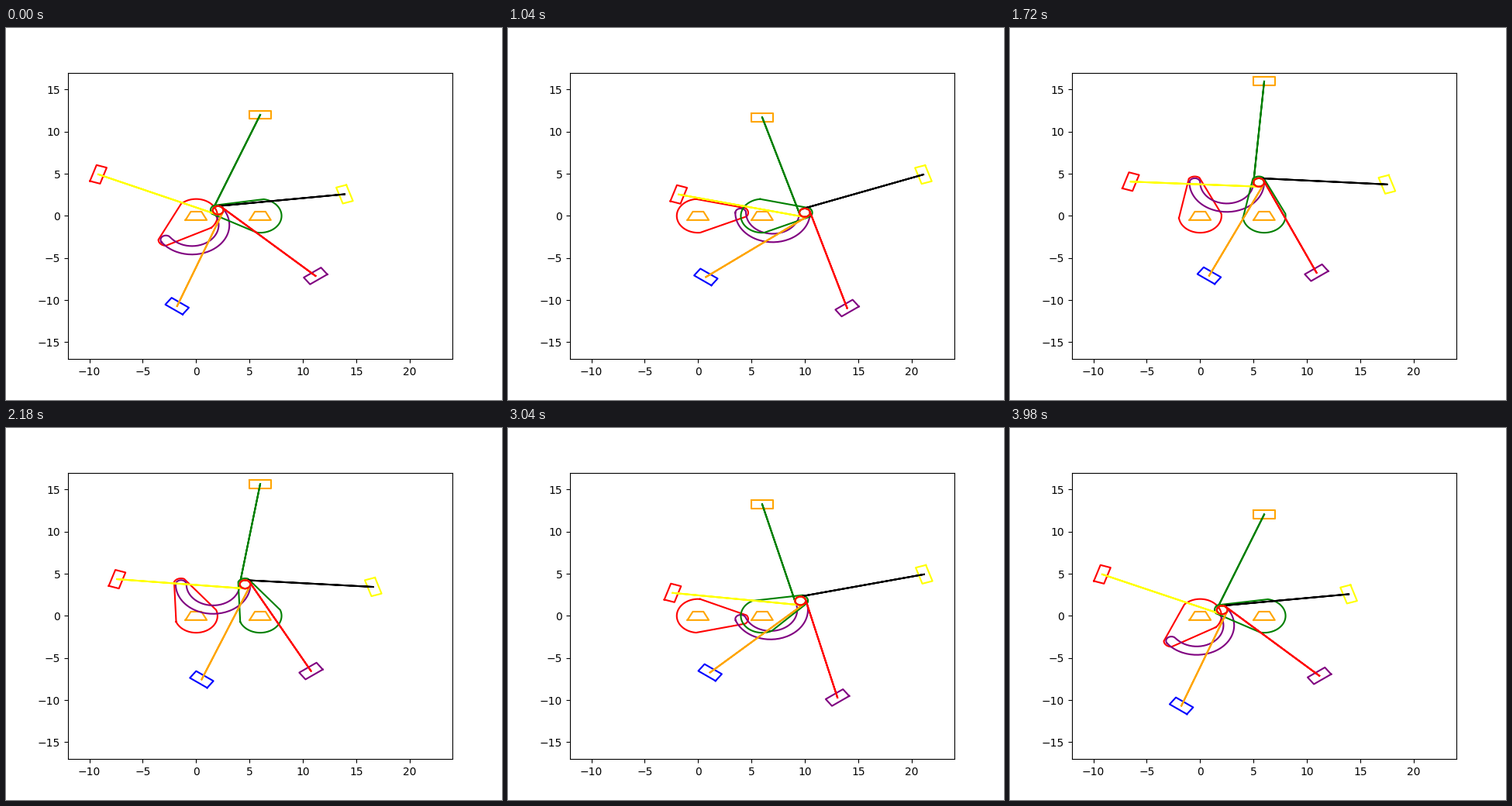
Recreate the animation shown at these times as a matplotlib script. Size 640x480 px, loop 4 s.

```python
import numpy as np
import matplotlib.pyplot as plt
from matplotlib.animation import FuncAnimation

FRAMES = 200
CRANK, COUPLER, ROD = 4, 6, 12
LEFT, RIGHT = np.array([0, 0]), np.array([6, 0])

# slide direction in degrees, rod colour, slider colour
CYLINDERS = [
    (90, "green", "orange"),
    (18, "black", "yellow"),
    (162, "yellow", "red"),
    (234, "orange", "blue"),
    (306, "red", "purple"),
]


def polar(angle, radius=1.0):
    return radius * np.array([np.cos(angle), np.sin(angle)])


def heading(vec):
    return np.arctan2(vec[1], vec[0])


def arc(center, radius, start, stop, n=60):
    a = np.radians(np.linspace(start, stop, n))
    return np.column_stack([center[0] + radius * np.cos(a),
                            center[1] + radius * np.sin(a)])


def closed(*parts):
    pts = np.vstack(parts)
    return np.vstack([pts, pts[:1]])


def crank_shape(pivot, pin):
    deg = np.degrees(heading(pin - pivot))
    return closed(arc(pivot, 2, deg + 90, deg + 270),
                  arc(pin, np.sqrt(0.5), deg - 45, deg + 45))


def coupler_shape(a, b):
    mid, deg = (a + b) / 2, np.degrees(heading(b - a))
    return closed(arc(mid, 3.5, deg - 180, deg),
                  arc(b, 0.5, deg, deg + 180),
                  arc(mid, 2.5, deg, deg - 180),
                  arc(a, 0.5, deg, deg + 180))


def rod_shape(slider, pin):
    deg = np.degrees(heading(pin - slider))
    return closed([slider], arc(pin, 0.5, deg - 90, deg + 270))


def slider_shape(center, angle):
    u, n = polar(angle, 0.5), polar(angle + np.pi / 2)
    return closed([center + u + n, center + u - n,
                   center - u - n, center - u + n])


def follower_pin(a):
    """Upper crossing of the coupler and right crank circles."""
    gap = RIGHT - a
    d = np.hypot(*gap)
    along = (COUPLER**2 - CRANK**2 + d**2) / (2 * d)
    height = np.sqrt(max(COUPLER**2 - along**2, 0))
    e = gap / d
    return a + along * e + height * np.array([-e[1], e[0]])


def slider_center(pin, angle):
    u, rel = polar(angle), pin - RIGHT
    along = rel @ u
    return RIGHT + u * (along + np.sqrt(ROD**2 - (rel @ rel - along**2)))


fig, ax = plt.subplots(figsize=(6.4, 4.8), dpi=100)
ax.set_xlim(-12, 24)
ax.set_ylim(-17, 17)


def outline(color):
    return ax.plot([], [], color=color, lw=1.5)[0]


base = np.array([(-1, -0.5), (1, -0.5), (0.5, 0.5), (-0.5, 0.5)])
for pivot in (LEFT, RIGHT):
    outline("orange").set_data(*closed(base + pivot).T)

driver, coupler, follower = map(outline, ("red", "purple", "green"))
sliders = [outline(c) for _, _, c in CYLINDERS]
rods = [outline(c) for _, c, _ in CYLINDERS]


def update(i):
    half = FRAMES // 2
    step = half - abs(i - half)
    a = polar(np.radians(-135 + 270 * step / half), CRANK)
    b = follower_pin(a)
    driver.set_data(*crank_shape(LEFT, a).T)
    coupler.set_data(*coupler_shape(a, b).T)
    follower.set_data(*crank_shape(RIGHT, b).T)
    for (deg, _, _), slider, rod in zip(CYLINDERS, sliders, rods):
        angle = np.radians(deg)
        s = slider_center(b, angle)
        slider.set_data(*slider_shape(s, angle).T)
        rod.set_data(*rod_shape(s, b).T)
    return [driver, coupler, follower, *sliders, *rods]


anim = FuncAnimation(fig, update, frames=FRAMES, interval=20,
                     repeat=True, repeat_delay=0)
plt.show()
```
